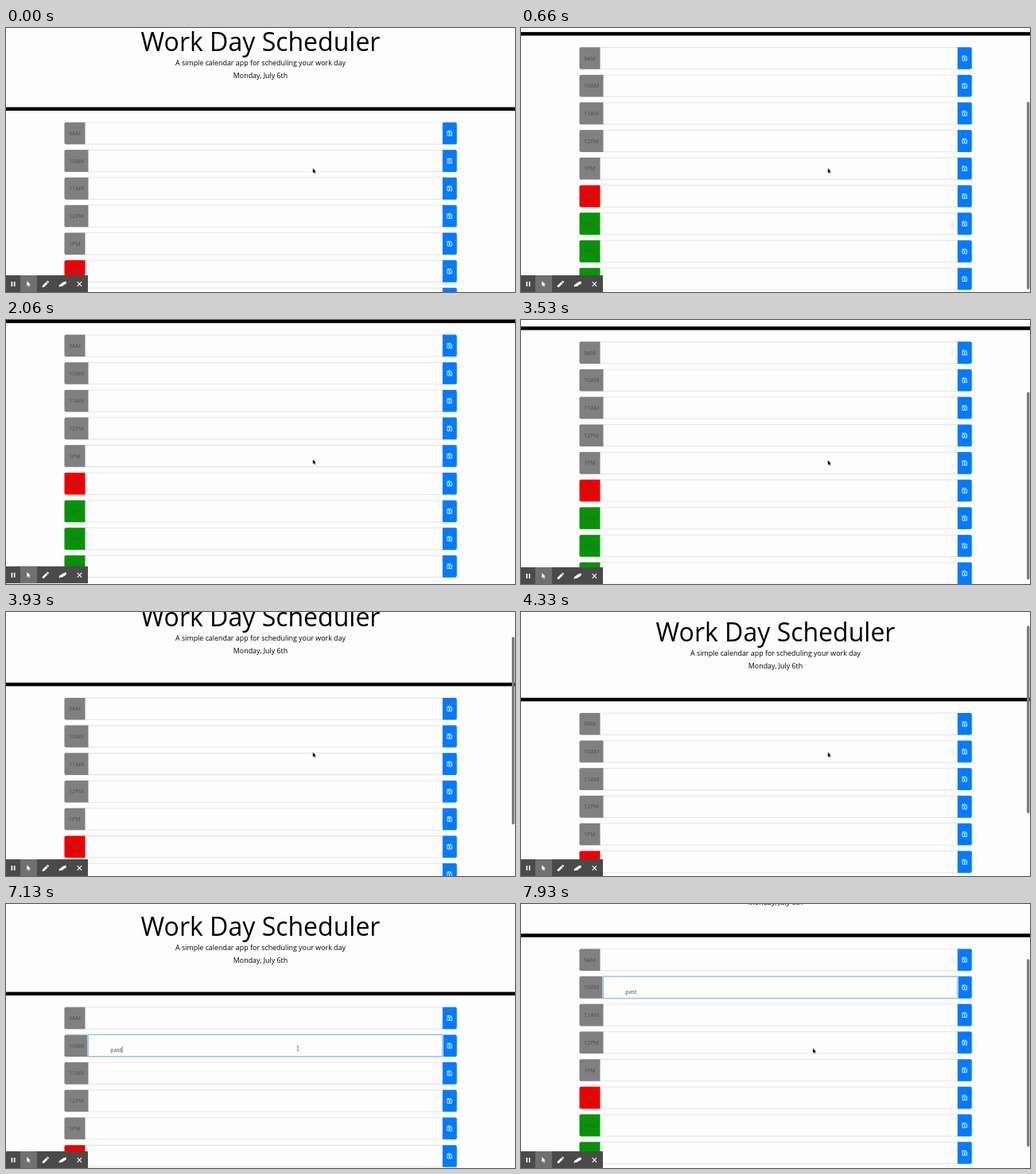
Recreate the animation shown at these times as an HTML page. Size 640 px wide and 332 px high, loop 8 s.

```html
<!DOCTYPE html>
<html lang="en">
<head>
<meta charset="utf-8">
<title>Work Day Scheduler</title>
<style>
html, body { margin: 0; width: 100%; height: 100%; overflow: hidden; background: #fdfdfd; }
svg { display: block; width: 100%; height: 100%; }
text { font-family: "Open Sans", "Noto Sans", sans-serif; font-size: 7.11px; fill: #495057; }
.head { font-size: 8.89px; fill: #000; text-anchor: middle; }
.title { font-size: 32px; }
</style>
</head>
<body>
<svg viewBox="0 0 640 332" xmlns="http://www.w3.org/2000/svg">
  <defs>
    <g id="save">
      <path d="M-2.7-2.9H1.5L2.9-1.5V2.9H-2.7Z" fill="none" stroke="#fff" stroke-width=".8" stroke-linejoin="round"/>
      <path d="M-1.6-2.8V-.9H1.2V-2.8" fill="none" stroke="#fff" stroke-width=".7"/>
      <circle cx=".1" cy="1" r=".95" fill="#fff"/>
    </g>
    <path id="arrow" d="M0 0V5.6L1.3 4.4L2.2 6.4L3.2 6L2.3 4H4Z"/>
  </defs>
  <g id="screen">
    <g id="page">
      <text class="head title" x="320" y="40">Work Day Scheduler</text>
      <text class="head" x="320" y="58">A simple calendar app for scheduling your work day</text>
      <text class="head" x="320" y="74">Monday, July 6th</text>
      <rect y="110.6" width="640" height="4.45"/>
      <g id="rows"></g>
      <g id="focus">
        <rect x="102.9" y="163.9" width="446.4" height="28.4" rx=".7" fill="none" stroke="#bfdeff" stroke-width="1.4"/>
        <rect x="103.6" y="164.6" width="445" height="27" fill="none" stroke="#80bdff" stroke-width=".8"/>
      </g>
      <text id="entry" x="131.3" y="185.8"></text>
      <rect id="caret" y="179.3" width=".7" height="8" fill="#333"/>
    </g>
    <rect id="bar" x="636" width="3.4" height="236" rx="1.7" fill="#7c7c7c"/>
    <g id="pointer">
      <use id="tip" href="#arrow" stroke="#fff" stroke-width=".7" paint-order="stroke"/>
      <path id="beam" d="M-1.4-3Q0-3 0-2Q0-3 1.4-3M0-2V2M-1.4 3Q0 3 0 2Q0 3 1.4 3" fill="none" stroke="#666" stroke-width=".7"/>
    </g>
    <g id="tools" fill="#fff">
      <rect y="311" width="103" height="21.3" fill="#4a4a4a"/>
      <rect x="18" y="311" width="21" height="21.3" fill="#707070"/>
      <path d="M6.6 319H8.2V325H6.6ZM9.9 319H11.5V325H9.9Z"/>
      <use href="#arrow" transform="translate(26.3 318.2) scale(1.15)"/>
      <path d="M45.8 326V324.1L50.6 319.3L52.5 321.2L47.7 326ZM51.1 318.8L51.9 318Q52.3 317.7 52.7 318L53.8 319.1Q54.1 319.5 53.8 319.9L53 320.7Z"/>
      <path d="M66.8 326V323.2L72 319.6L75.6 318.4V321.6L70.2 325L68.6 324.8Z"/>
      <path d="M89.7 319.2L95.1 324.8M95.1 319.2L89.7 324.8" stroke="#fff" stroke-width="1.1"/>
    </g>
  </g>
</svg>
<script>
const el = id => document.getElementById(id);
const FRAME = 1000 / 15, LOOP = 8000, BOTTOM = 110;

const hours = ["9AM", "10AM", "11AM", "12PM", "1PM", "2PM", "3PM", "4PM", "5PM"];
el("rows").innerHTML = hours.map((hour, i) => {
  const w = hour.length > 3 ? 30 : 26;
  const color = i < 5 ? "#808080" : i === 5 ? "#ee0000" : "#069406";
  return `<g transform="translate(73.5 ${129.7 + 34.69 * i})">
    <rect x=".2" y=".2" width="492.8" height="27.2" rx="1.8" fill="#fdfdfd" stroke="#ced4da" stroke-width=".6"/>
    <path d="M${w} 0V27.6H1.8Q0 27.6 0 25.8V1.8Q0 0 1.8 0Z" fill="${color}"/>
    <text x="5.5" y="16.4">${hour}</text>
    <path d="M475.4 0H491.5Q493.3 0 493.3 1.8V25.8Q493.3 27.6 491.5 27.6H475.4Z" fill="#007bff"/>
    <use href="#save" x="484.2" y="13.8"/>
  </g>`;
}).join("");

// Linear interpolation through [time, value] points
function track(t, points) {
  let [t0, v0] = points[0];
  for (const [t1, v1] of points) {
    if (t < t1) return t <= t0 ? v0 : v0 + (v1 - v0) * (t - t0) / (t1 - t0);
    [t0, v0] = [t1, v1];
  }
  return v0;
}

// Trackpad swipe: quick start, long glide
function swipe(time, tau) {
  const x = Math.max(0, time) / tau;
  return 1 - (1 + x) * Math.exp(-x);
}

function scrollAt(t) {
  if (t < 3400) return BOTTOM * swipe(t + 80, 150);
  if (t < 4650) return BOTTOM * (1 - swipe(t - 3467, 155));
  return BOTTOM * swipe(t - 7533, 175);
}

const show = (id, on) => el(id).setAttribute("opacity", +on);
const move = (id, x, y) => el(id).setAttribute("transform", `translate(${x} ${y})`);

function draw(now) {
  const t = Math.floor((now % LOOP + 7) / FRAME) * FRAME;
  const scroll = scrollAt(t);

  move("screen", 0, track(t, [[860, 0], [1130, -2], [1790, -2], [2060, -1.2], [2330, -1], [2800, -1], [3200, 0]]));
  move("page", 0, -scroll);

  el("bar").setAttribute("y", 15.3 + 0.735 * scroll);
  show("bar", t < 30 ? 0
    : t < 3500 ? track(t, [[1450, 1], [1730, 0]])
    : t < 7590 ? track(t, [[4930, 1], [5200, 0]]) : 1);

  move("pointer", track(t, [[5330, 385.8], [5730, 367]]), track(t, [[5330, 176.6], [5730, 181.6]]));
  const beam = t > 5340 && t < 7590;
  show("beam", beam);
  show("tip", !beam);

  show("focus", track(t, [[5730, 0], [5930, 1]]));
  const typed = t < 6130 ? 0 : Math.min(4, 1 + Math.floor((t - 6130) / 133));
  el("entry").textContent = "past".slice(0, typed);
  el("caret").setAttribute("x", 131.4 + (typed ? el("entry").getComputedTextLength() : 0));
  show("caret", t > 5790 && t < 6790 || t > 7120 && t < 7590);
}

const start = performance.now();
function tick() {
  draw(performance.now() - start);
  requestAnimationFrame(tick);
}
tick();
</script>
</body>
</html>
```
